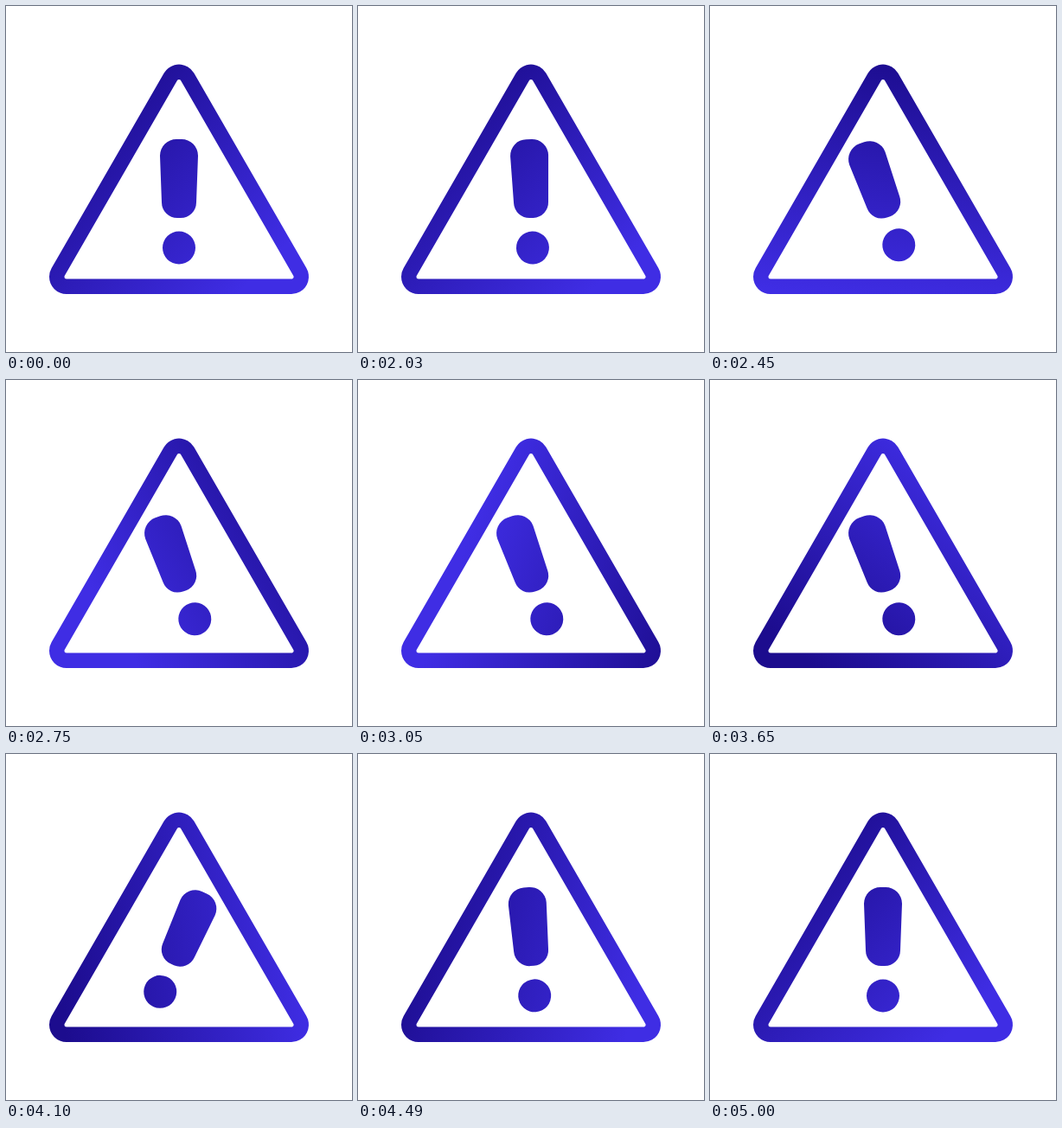
Animation, 400 px wide and 400 px high, one loop 5.03 s. Source, as an HTML page with a canvas:

```html
<!DOCTYPE html>
<html>
<head>
<meta charset="utf-8">
<style>
  html, body { margin: 0; height: 100%; overflow: hidden; background: #fff; }
  canvas { display: block; }
</style>
</head>
<body>
<canvas id="stage" width="400" height="400"></canvas>
<script>
const ctx = document.getElementById('stage').getContext('2d');
const LOOP = 5030, REST = 2000, STEP = 30, LAST = 100;
const RAD = Math.PI / 180;

// Gradient path: [step, degrees of the bright end, shift along that direction]
const TURN = [
  [0, 45, 0], [15, 97, 0], [35, 200, -68], [55, 308, -10], [70, 355, 0], [100, 405, 0]
];

const mix = (a, b, k) => a + (b - a) * k;
const ease = k => k * k * (3 - 2 * k);

function makeGradient(step) {
  let i = 1;
  while (i < TURN.length - 1 && step > TURN[i][0]) i++;
  const [s0, a0, d0] = TURN[i - 1], [s1, a1, d1] = TURN[i];
  const k = (step - s0) / (s1 - s0);
  const angle = mix(a0, a1, k) * RAD, shift = mix(d0, d1, k);
  const x = d => 200 + d * Math.cos(angle), y = d => 200 + d * Math.sin(angle);
  const from = shift - 142, to = shift + 142;
  const g = ctx.createLinearGradient(x(from), y(from), x(to), y(to));
  g.addColorStop(0, '#1c0c8e');
  g.addColorStop(1, '#3f2de4');
  return g;
}

// Swings to the left and right, five steps per swing
function swingPose(i) {
  if (i <= 0 || i >= LAST / 5) return 0;
  return i % 2 ? -20 : 24;
}

function swing(step) {
  const i = Math.floor(step / 5);
  return mix(swingPose(i), swingPose(i + 1), ease(step / 5 - i)) * RAD;
}

function triangle(paint, width) {
  ctx.beginPath();
  ctx.moveTo(200, 87.5);
  ctx.lineTo(330, 313);
  ctx.lineTo(70, 313);
  ctx.closePath();
  ctx.fillStyle = ctx.strokeStyle = paint;
  ctx.lineWidth = width;
  ctx.fill();
  ctx.stroke();
}

function mark(paint, angle) {
  const q = Math.PI / 2;
  ctx.save();
  ctx.translate(200, 226);
  ctx.rotate(angle);
  ctx.beginPath();
  ctx.arc(-3, -53, 19, 2 * q, 3 * q);
  ctx.arc(3, -53, 19, 3 * q, 4 * q);
  ctx.arc(2, 1, 18, 0, q);
  ctx.arc(-2, 1, 18, q, 2 * q);
  ctx.closePath();
  ctx.moveTo(19, 53.5);
  ctx.arc(0, 53.5, 19, 0, 4 * q);
  ctx.restore(); // the gradient stays fixed to the stage
  ctx.fillStyle = paint;
  ctx.fill();
}

ctx.lineJoin = 'round';
const start = performance.now();

function draw() {
  const t = (performance.now() - start) % LOOP;
  const step = Math.min(LAST, Math.max(0, Math.floor((t - REST) / STEP)));
  const paint = makeGradient(step);
  ctx.fillStyle = '#fff';
  ctx.fillRect(0, 0, 400, 400);
  triangle(paint, 40);
  triangle('#fff', 5);
  mark(paint, swing(step));
  requestAnimationFrame(draw);
}
draw();
</script>
</body>
</html>
```
